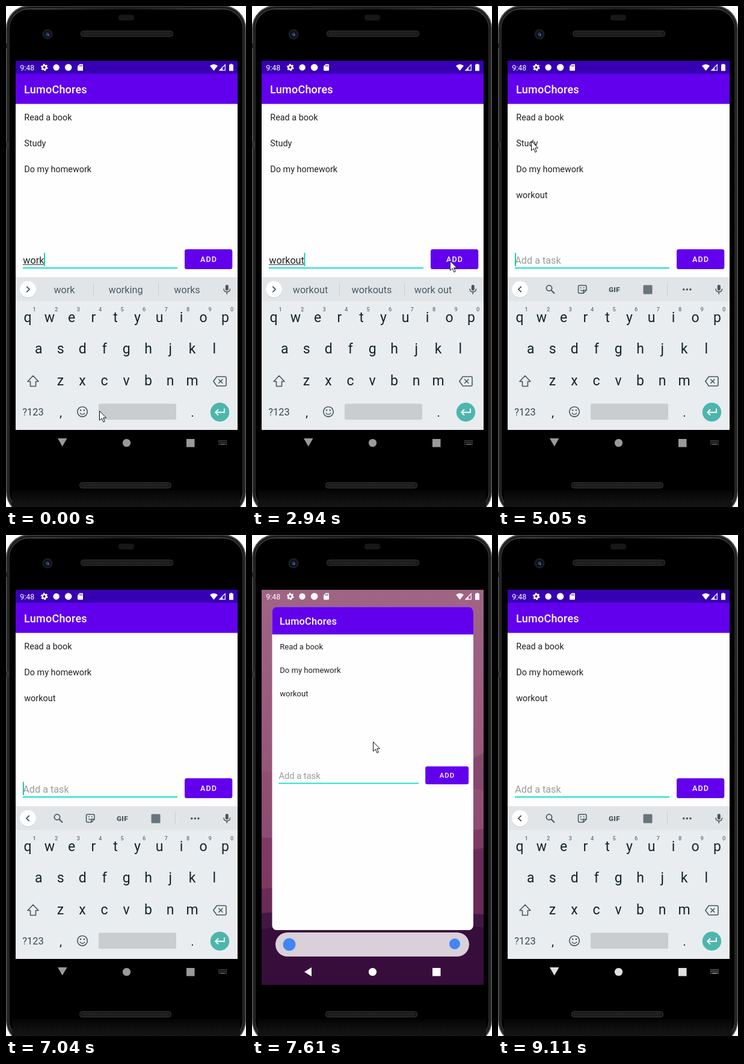
An HTML page that plays this animation: 399 px wide and 832 px high, repeating every 9.33 s.

```html
<!DOCTYPE html>
<html lang="en">
<head>
<meta charset="utf-8">
<title>To-do app demo</title>
<style>
html, body { margin: 0; width: 100%; height: 100%; overflow: hidden; background: #fff; }
svg { display: block; width: 399px; height: 832px; font-family: Roboto, sans-serif; }
</style>
</head>
<body>
<svg id="stage" viewBox="0 0 399 832" xmlns="http://www.w3.org/2000/svg"></svg>
<script>
const LOOP = 9330;
const stage = document.getElementById('stage');
const $ = id => document.getElementById(id);

const rect = (x, y, w, h, fill, more = '') =>
  `<rect x="${x}" y="${y}" width="${w}" height="${h}" fill="${fill}" ${more}/>`;
const disc = (x, y, r, fill, more = '') =>
  `<circle cx="${x}" cy="${y}" r="${r}" fill="${fill}" ${more}/>`;
const label = (x, y, size, fill, str, more = '') =>
  `<text x="${x}" y="${y}" font-size="${size}" fill="${fill}" ${more}>${str}</text>`;
const shape = (d, fill, more = '') => `<path d="${d}" fill="${fill}" ${more}/>`;
const line = (d, color, w = 1.6, more = '') =>
  shape(d, 'none', `stroke="${color}" stroke-width="${w}" ${more}`);
const group = (id, body, more = '') => `<g id="${id}" ${more}>${body}</g>`;
const MID = 'text-anchor="middle"';

function phone() {
  return rect(0, -1, 399, 846, '#4a4a4b', 'rx="38"') +
    rect(2, 1, 395, 842, '#1b1b1c', 'rx="36"') +
    rect(5, 5, 389, 834, '#000', 'rx="33" stroke="url(#rim)" stroke-width="1.2"') +
    rect(10, 804, 379, 28, 'url(#chin)') +
    rect(0, 62, 4, 8, '#222') + rect(0, 226, 5, 10, '#333') +
    rect(187, 14.5, 26, 9.5, '#171717', 'rx="4"') +
    disc(69, 47, 8.5, '#1b1c20') + disc(69, 47, 5.5, '#0b0f1c') +
    disc(69, 47, 3, '#27395f') + disc(70.5, 48.5, 1.1, '#7d8db0') +
    speaker(124, 41, 154) + speaker(122, 791, 153);
}

function speaker(x, y, w) {
  return rect(x + .5, y + .5, w - 1, 9, '#181818', 'rx="4" stroke="#3b3b3b"') +
    line(`M${x + 5} ${y + 5}H${x + w - 5}`, '#2a2a2a', 4, 'stroke-dasharray="1.5 1.5"');
}

function wallpaper() {
  const dock = [[131.5, '#1a73e8'], [200.5, '#fff'], [269.5, '#db4437']];
  return rect(16, 91, 369, 656, 'url(#sky)') +
    shape('M16 392L85 398 200 400 317 396 385 362V560H16Z', '#884970', 'opacity=".45"') +
    shape('M317 398L385 362V424L317 412Z', '#7c4169', 'opacity=".5"') +
    shape('M16 502L85 507 160 520 260 514 330 494 385 488V640H16Z', '#7c3561', 'opacity=".8"') +
    shape('M16 588L95 578 180 556 182 544 250 540 320 528 385 520V660H16Z', '#6b2a58') +
    shape('M16 628L60 624 92 614 120 622 160 629 205 626 250 622 288 612 325 620 350 628 385 630V747H16Z', '#431745') +
    shape('M16 655L90 642 150 656 240 648 310 640 385 652V747H16Z', '#370e3b') +
    dock.map(([x, c]) => disc(x, 599, 22.7, c)).join('') +
    disc(216.5, 583, 6, '#90e4f4') +
    rect(39, 660, 322, 40, '#d9d0d9', 'rx="20"') +
    disc(62, 680, 10.5, '#4285f4') + disc(337, 679, 9, '#4285f4');
}

function app() {
  return rect(16, 112, 369, 592, '#fefefe') + rect(16, 112, 369, 50.6, '#6200ee') +
    label(30, 145, 18, '#fff', 'LumoChores', 'font-weight="500" letter-spacing=".22"') +
    [0, 1, 2, 3].map(i => `<text id="row${i}" x="30.3" y="${190 + 43 * i}" font-size="14.4" fill="#212121"/>`).join('') +
    label(28.3, 427.5, 16.2, '#9b9b9b', 'Add a task', 'id="hint"') +
    label(28.3, 427.5, 16.2, '#212121', '', 'id="typed"') +
    rect(28, 429, 0, 1, '#333', 'id="compose"') +
    rect(28, 434.2, 257, 1.8, '#03dac5') + rect(28, 410, 1.8, 22, '#03c4b4', 'id="caret"') +
    rect(297, 404, 79.3, 33, '#6200ee', 'rx="3.6" id="button"') +
    label(323, 425.2, 12.57, '#fff', 'ADD', 'font-weight="500" letter-spacing="1.12"');
}

function gear(x, y) {
  return disc(x, y, 3.2, 'none', 'stroke="#fff" stroke-width="2.6"') +
    disc(x, y, 5, 'none', 'stroke="#fff" stroke-width="1.8" stroke-dasharray="2.6 2.636"');
}

function status() {
  return rect(16, 91, 369, 21.5, '#3700b3', 'id="bar"') +
    label(23.2, 106.6, 12.5, '#fff', '9:48') + gear(63.7, 102) +
    disc(83.6, 102, 5.2, '#fff') + disc(103.6, 102, 5.8, '#fff') +
    shape('M122.5 96.5H127Q128 96.5 128 97.5V106.5Q128 107.5 127 107.5H120Q119 107.5 119 106.5V100Z', '#fff') +
    line('M122.6 98.3V100.6M124.4 98.3V100.6M126.2 98.3V100.6', '#3700b3', .9) +
    shape('M345.5 107.5L339 99.3Q345.5 94.3 352 99.3Z', '#fff') +
    line('M355 106.8H364.3V97.5Z', '#fff', 1.2) + shape('M355 107L360 102V107Z', '#fff') +
    shape('M373 97.2V96H376V97.2H378V107.7H371V97.2Z', '#fff');
}

function keyboard() {
  const ink = '#14242b', soft = '#48565c', step = 36.5;
  const keys = (str, x, y) => [...str].map((c, i) =>
    label(x + step * i, y, 23, ink, c, MID)).join('');
  const hints = [...'1234567890'].map((c, i) =>
    label(47.2 + step * i, 507, 9.3, '#647177', c, MID + ' font-weight="500"')).join('');
  const words = [97, 199, 301].map((x, i) => label(x, 476.7, 16.2, '#4e5b61', '', `id="word${i}" ${MID}`)).join('');
  const split = x => rect(x, 460, 1, 21, '#c9ced1');
  const tools =
    disc(85, 468.5, 4.6, 'none', `stroke="${soft}" stroke-width="1.7"`) + line('M88.4 472L94 477.5', soft, 2) +
    line('M135.5 464H145Q147 464 147 466V472L142 477H135.5Q133.5 477 133.5 475V466Q133.5 464 135.5 464ZM147 472H142V477', soft, 1.5) +
    line('M137 471Q139.5 475 142.5 471', soft, 1.2) + disc(137.7, 468, .9, soft) + disc(142.7, 468, .9, soft) +
    label(193.5, 474.6, 11.8, soft, 'GIF', MID + ' font-weight="900" letter-spacing=".3"') +
    rect(241.5, 463.5, 15, 15, '#68757a', 'rx="1.5"') + split(281) +
    [308.7, 314.3, 319.9].map(x => disc(x, 470.7, 1.8, soft)).join('');
  return rect(16, 450.5, 369, 254, '#e9edf0') + rect(16, 450.5, 369, 39.5, '#e1e5e8') +
    disc(36.5, 471.3, 13.6, '#c6cbce') + disc(36.5, 470.5, 13.5, '#fff') +
    line('', '#37474f', 1.7, 'id="chevron"') +
    group('words', words + split(145) + split(253)) + group('tools', tools) +
    rect(364.8, 463, 5, 9.5, soft, 'rx="2.5"') +
    line('M362 469.5Q362 474.8 367.3 474.8T372.6 469.5M367.3 475V478.7', soft, 1.5) +
    keys('qwertyuiop', 36, 524.5) + hints +
    keys('asdfghjkl', 54.2, 577) + keys('zxcvbnm', 90.5, 630) +
    line('M45 614L54 623.5H49.5V631.5H40.5V623.5H36Z', soft, 1.6, 'stroke-linejoin="round"') +
    line('M350.5 615.5H364Q366 615.5 366 617.5V629Q366 631 364 631H350.5L344.8 623.3Z', soft, 1.6, 'stroke-linejoin="round"') +
    line('M353.3 619.8L360.3 626.8M360.3 619.8L353.3 626.8', soft, 1.6) +
    label(45, 679.6, 16.4, '#37474f', '?123', MID) + label(91, 682, 21, ink, ',', MID) +
    label(310, 682, 21, ink, '.', MID) +
    disc(127, 673.8, 8.3, 'none', `stroke="${soft}" stroke-width="1.6"`) +
    disc(124.1, 671.3, 1.3, soft) + disc(129.9, 671.3, 1.3, soft) +
    line('M122.8 675.6Q127 681.3 131.2 675.6', soft, 1.5) +
    rect(154, 660.5, 129, 26.5, '#c9cdd0', 'rx="2"') +
    disc(355.5, 674.5, 15.7, '#4db6ac') +
    line('M363 668.5V674.8H348.5M353 670L348.3 674.8 353 679.6', '#fff', 1.9);
}

function nav() {
  let dots = '';
  for (let r = 0; r < 3; r++)
    for (let c = 0; c < 6; c++)
      dots += r === 2 && c > 0 && c < 5 ? '' : rect(353.3 + c * 2.4, 721.5 + r * 2.8, 1.4, 1.4, 'currentColor');
  return shape('', 'currentColor', 'id="back"') + disc(200.5, 725.5, 6.6, 'currentColor') +
    rect(300, 719, 13.5, 13.5, 'currentColor') +
    group('dots', dots + rect(356, 727.2, 8.5, 1.4, 'currentColor'), 'opacity=".8"');
}

stage.innerHTML = `<defs>
  <linearGradient id="rim" x1="0" y1="0" x2="1" y2="0"><stop stop-color="#3a3a3a"/><stop offset=".12" stop-color="#777"/>
    <stop offset=".5" stop-color="#1c1c1c"/><stop offset=".88" stop-color="#777"/><stop offset="1" stop-color="#3a3a3a"/></linearGradient>
  <linearGradient id="chin" x1="0" y1="0" x2="0" y2="1"><stop stop-color="#050505"/><stop offset="1" stop-color="#161616"/></linearGradient>
  <linearGradient id="sky" x1="0" y1="0" x2="0" y2="1"><stop stop-color="#a06485"/><stop offset=".45" stop-color="#985678"/>
    <stop offset="1" stop-color="#833a66"/></linearGradient>
  <clipPath id="screen"><rect x="16" y="91" width="369" height="656"/></clipPath>
  <clipPath id="card"><rect id="cardBox" x="16" y="112" width="369" height="592"/></clipPath>
  <clipPath id="above"><rect x="16" y="91" width="369" height="613"/></clipPath>
</defs>` + phone() +
  group('home', wallpaper(), 'clip-path="url(#screen)"') +
  rect(85, 143, 232, 372, '#000', 'rx="6" opacity=".18" id="shade"') +
  group('app', group('page', app(), 'clip-path="url(#card)"')) +
  disc(200.5, 141.3, 19.6, '#3ddc84', 'id="badge"') + status() +
  `<g clip-path="url(#above)">${group('keys', keyboard())}</g>` + group('nav', nav()) +
  shape('M.5 .5V16.2L4.2 12.8 6.9 18.9 9.3 17.8 6.7 11.9H11.6Z', '#fff', 'id="pointer" stroke="#111" stroke-linejoin="round"');

// Each entry holds from its time until the next one.
const at = (list, t) => list.reduce((v, e) => t >= e[0] ? e[1] : v, list[0][1]);

const typing = [[0, 'work'], [430, 'worko'], [710, 'workou'], [990, 'workout'], [3200, '']];
const offers = [[0, 'work,working,works'], [430, 'worko,workout,workouts'],
  [710, 'workou,workout,workouts'], [990, 'workout,workouts,work out']];
const tasks = [[0, 'Read a book,Study,Do my homework'], [3200, 'Read a book,Study,Do my homework,workout'],
  [5850, 'Read a book,Do my homework,workout']];
const blinks = [1450, 1850, 2380, 2940, 3640, 4200, 4750, 5050, 5580, 6150, 6600, 7040, 7180, 8180, 8420, 8840, 9110];
const zoom = [[0, 1], [7180, 0], [7460, .2], [7600, .75], [7760, 1]];
const drop = [[0, 0], [7180, 260], [7910, 170], [8040, 50], [8180, 0]];
const navInk = [[0, '#9a9a9a'], [7180, '#fff'], [8840, '#f6f6f6'], [8980, '#ececec'], [9110, '#e0e0e0']];

// start, end, steps, target x, target y
const moves = [
  [0, 0, 1, 155, 672], [1300, 2230, 8, 329, 423], [3640, 4600, 8, 217, 299],
  [4750, 5050, 3, 55, 224], [6000, 6760, 6, 374, 925], [7180, 7180, 1, 201, 331],
  [7460, 7460, 1, 201, 343], [7910, 8420, 5, 325, 826], [8540, 8540, 1, 325, 850]
];

function pointerAt(t) {
  let x = 0, y = 0;
  for (const [from, to, n, tx, ty] of moves) {
    if (t < from) break;
    const k = n === 1 ? 1 : Math.min(1, (Math.floor((t - from) / (to - from) * (n - 1) + 1e-6) + 1) / n);
    x += (tx - x) * k;
    y += (ty - y) * k;
  }
  return [x, y];
}

const set = (id, attrs) => { for (const k in attrs) $(id).setAttribute(k, attrs[k]); };
const show = (id, on) => set(id, { visibility: on ? 'visible' : 'hidden' });
const write = (id, str) => { if ($(id).textContent !== str) $(id).textContent = str; };

function draw(t) {
  const text = at(typing, t);
  write('typed', text);
  show('hint', !text);
  const width = text ? $('typed').getComputedTextLength() : 0;
  set('compose', { width });
  set('caret', { x: 28 + width });
  show('caret', blinks.filter(b => t >= b).length % 2 === 0);

  const rows = at(tasks, t).split(',');
  for (let i = 0; i < 4; i++) write('row' + i, rows[i] || '');
  at(offers, t).split(',').forEach((w, i) => write('word' + i, w));
  show('words', text);
  show('tools', !text);
  set('chevron', { d: text ? 'M34.3 465.8L39 470.5 34.3 475.2' : 'M38.7 465.8L34 470.5 38.7 475.2' });
  set('button', { fill: t >= 3060 && t < 3200 ? '#8a40f2' : t >= 3200 && t < 3360 ? '#7620f0' : '#6200ee' });

  const z = at(zoom, t), full = z === 1, recents = z === 0;
  const s = .629 + .371 * z;
  const left = 85 - 69 * z, top = 141 - 29 * z;
  set('app', { transform: `translate(${left - 16 * s} ${top - 112 * s}) scale(${s})` });
  set('cardBox', { rx: full ? 0 : 9 });
  show('home', !full);
  show('shade', recents);
  show('badge', recents);
  show('bar', full);

  const dy = at(drop, t);
  set('keys', { transform: `translate(0 ${dy})` });
  set('nav', { color: at(navInk, t) });
  set('back', { d: full ? 'M86 718H101.5L93.7 731.5Z' : 'M87 725.5L99 718V733Z' });
  show('dots', full);

  const [x, y] = pointerAt(t);
  set('pointer', { transform: `translate(${x} ${y})` });
}

let start;
function tick(now) {
  if (start === undefined) start = now;
  draw((now - start) % LOOP);
  requestAnimationFrame(tick);
}
draw(0);
requestAnimationFrame(tick);
</script>
</body>
</html>
```
